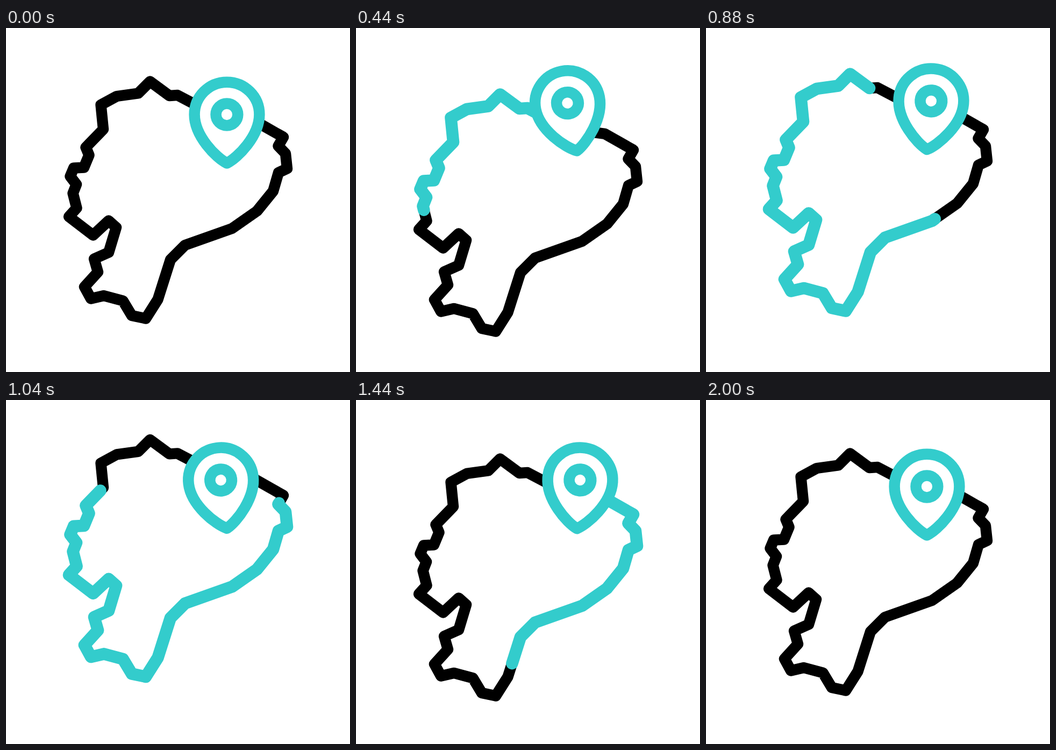
Write an HTML page that moves like this. It is 640 by 640 pixels and loops after 2440 ms.

```html
<!DOCTYPE html>
<html lang="en">
<head>
<meta charset="utf-8">
<title>Map pin</title>
<style>
  html, body { margin: 0; width: 100%; height: 100%; overflow: hidden; background: #fff; }
  svg { display: block; width: 100vw; height: 100vh; }
  path, circle { fill: none; stroke-linecap: round; stroke-linejoin: round; }
  .line { stroke: #000; stroke-width: 20.4; }
  .trail { stroke: #3cc; stroke-width: 22.6; }
  .pin * { stroke: #3cc; stroke-width: 20.5; }
  .pin path { fill: #fff; }
</style>
</head>
<body>
<svg viewBox="0 0 640 640">
  <g id="map">
    <path class="line" id="line"/>
    <path class="trail" id="trail"/>
  </g>
  <g class="pin" id="pin">
    <path d="M411 100.7C377.6 100.7 350.6 127.7 350.6 161C350.6 201 391 241.5 411 251.5C431 241.5 471.4 201 471.4 161C471.4 127.7 444.4 100.7 411 100.7Z"/>
    <circle cx="410.9" cy="161" r="20.4"/>
  </g>
</svg>
<script>
const LOOP = 2440, END = 2000, STEP = 40;
const $ = id => document.getElementById(id);
const [map, line, trail, pin] = ['map', 'line', 'trail', 'pin'].map($);

// Corners of the border, counter-clockwise from the point under the pin
const border = `M367 170 361 147 319 125 304 126 268 99.5 246 121.5 206 127 176.5 143
  181 188.5 148.5 222 154.5 236.5 145 259.5 126 260.5 119.5 276 131 291 124.5 307.5
  131.5 335 117 351 162 385.5 191 358.5 205 371 191 417.5 164 429.5 171 454 146 481.5
  158 503.5 182 498 217.5 507.5 234 535 260 540.5 282.5 505 306 431 333 404 420.5 373
  467 340.5 497 303.5 507 269 523 261.5 520 233.5 506.5 219.5 516 203 463 173 440 170
  400 163Z`;
line.setAttribute('d', border);
trail.setAttribute('d', border);
const total = trail.getTotalLength();

const clamp = x => Math.min(1, Math.max(0, x));
const smooth = x => x * x * (3 - 2 * x);

// Ease from one turning point to the next; level(i) is the value at point i
function swing(level, x) {
  const i = Math.floor(x);
  return level(i) + (level(i + 1) - level(i)) * smooth(x - i);
}

// The map rises and falls twice, the second time half as far
function sway(t) {
  const beat = t < 1040 ? t / 520 : 2 + (t - 1040) / 480;
  return swing(i => [0, 25.6, -25.6, 12.8][i] || 0, beat);
}

// The pin tilts to and fro, each swing half as wide after the second
function tilt(t) {
  return swing(i => i && (-1) ** i * 15.3 * 2 ** Math.min(0, 2 - i), t / 357);
}

// Three ever lower hops
function hop(t) {
  const n = Math.floor(t / 600), u = t % 600;
  const peak = n ? 280 : 320;
  const height = Math.max(0, 38 - 12.5 * n) * (n < 3);
  return -height * smooth(u < peak ? u / peak : (600 - u) / (600 - peak));
}

// Distance along the border, with a slightly quick start
function travel(x) {
  const p = clamp(x);
  return total * smooth(p + 0.19 * p * (1 - p) ** 2);
}

function draw(t) {
  const head = travel(t / 1330), tail = travel((t - 720) / 1270);
  const rest = t >= END;
  map.setAttribute('transform', `translate(0 ${sway(t)})`);
  pin.setAttribute('transform',
    `translate(0 ${hop(t)}) rotate(${rest ? 0 : tilt(t)} 411 251.5)`);
  trail.style.visibility = head - tail > 0.5 ? 'visible' : 'hidden';
  trail.setAttribute('stroke-dasharray', `${head - tail} ${total * 2}`);
  trail.setAttribute('stroke-dashoffset', -tail);
}

const start = performance.now();
function tick() {
  const t = (performance.now() - start) % LOOP;
  draw(Math.min(END, Math.floor(t / STEP) * STEP));
  requestAnimationFrame(tick);
}
tick();
</script>
</body>
</html>
```
